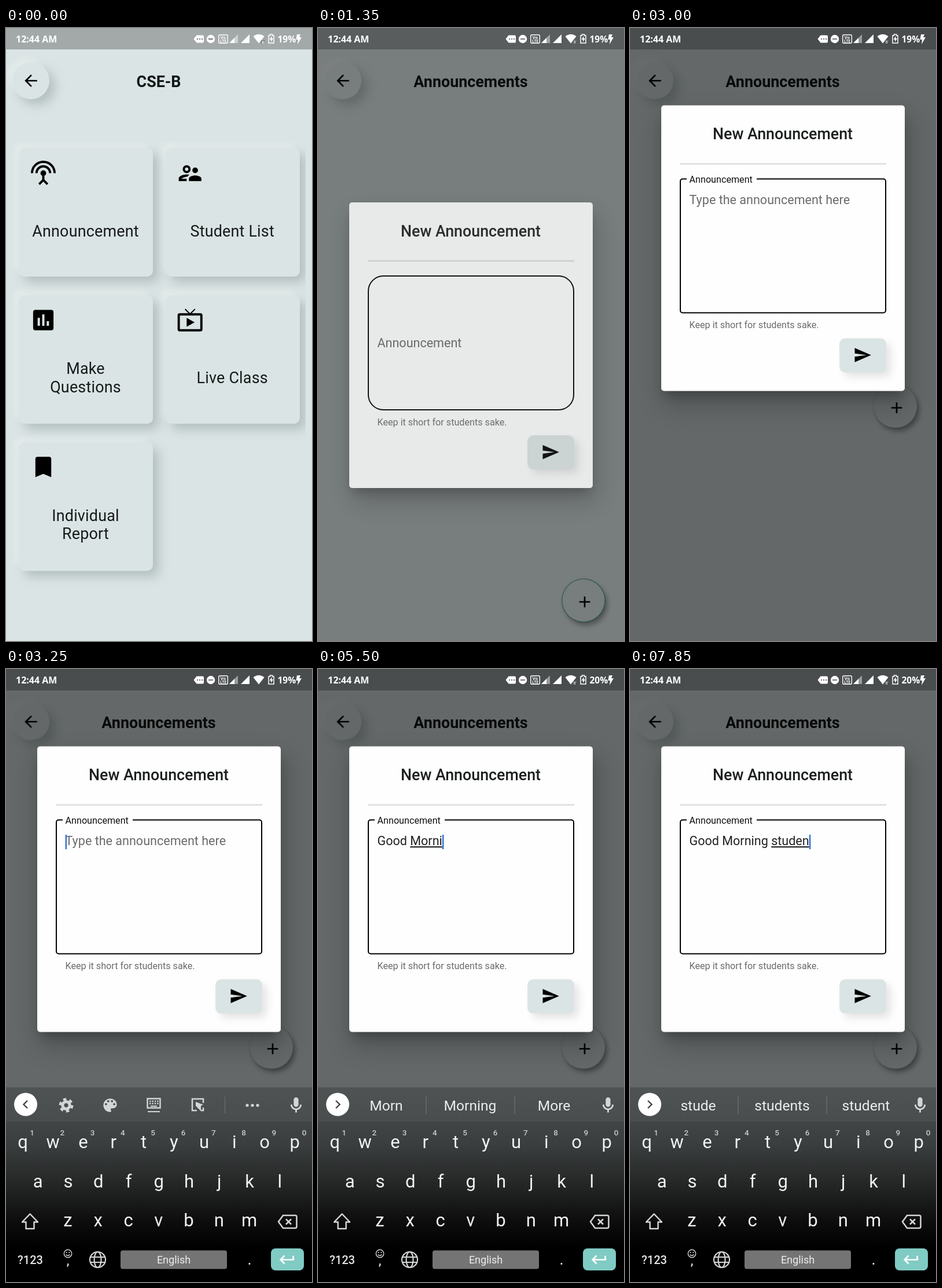
Write an HTML page that moves like this. It is 529 px wide and 1058 px high and loops after 8000 ms.

```html
<!DOCTYPE html>
<html>
<head>
<meta charset="utf-8">
<style>
html, body { margin: 0; width: 100%; height: 100%; overflow: hidden; background: #dbe4e4; }
#stage { position: relative; width: 529px; height: 1058px; overflow: hidden; }
#stage div, svg { position: absolute; }
.layer, svg { left: 0; top: 0; width: 529px; height: 1058px; }
svg { overflow: visible; }
text { font-family: Roboto, sans-serif; white-space: pre; }
.status text { font-family: "Noto Sans", sans-serif; }
.page { background: #dbe4e4; }
.soft { background: #dbe4e4; box-shadow: -8px -8px 12px rgba(255,255,255,.26), 10px 10px 18px rgba(110,128,128,.36); }
.round { border-radius: 50%; }
#grid { left: 11px; top: 196px; width: 507px; height: 820px; overflow: hidden; }
.card { width: 232px; height: 222px; border-radius: 10px; }
#fab { left: 422px; top: 951px; width: 74px; height: 74px; background: #dbe4e4; box-shadow: 4px 6px 9px rgba(0,0,0,.36), 0 0 5px rgba(0,0,0,.08); }
#barrier { background: #000; }
#dialog { left: 54px; top: 301px; width: 421px; height: 493px; border-radius: 5px; background: #fdfefd;
  box-shadow: 0 13px 18px -6px rgba(0,0,0,.24), 6px 22px 44px 4px rgba(0,0,0,.2); }
#field { left: 32px; top: 125.5px; width: 357px; height: 233px; box-sizing: border-box; border: 2.8px solid #000; }
#gap { left: 44px; top: 124px; height: 6px; background: #fdfefd; }
#send { left: 308px; top: 401.5px; width: 81px; height: 59px; border-radius: 10px; background: #dbe4e4; box-shadow: 8px 8px 14px rgba(0,0,0,.1); }
#keys { background: linear-gradient(#4f5353 722px, #494d4d 781px, #414545 781px, #3b3e3e 820px, #262828 885px, #0e0e0e 950px, #000 1000px); clip-path: inset(722px 0 0 0); }
.status { height: 37px !important; background: rgba(0,0,0,.26); }
</style>
</head>
<body>
<div id="stage"></div>
<script>
const icons = {
  back: 'M20 11H7.83l5.59-5.59L12 4l-8 8 8 8 1.41-1.41L7.83 13H20z',
  antenna: 'M12 5a7 7 0 0 0-7 7h2a5 5 0 0 1 10 0h2a7 7 0 0 0-7-7zm1 9.29a2.5 2.5 0 1 0-2 0v3.3L7.59 21 9 22.41l3-3 3 3L16.41 21 13 17.59zM12 1A11 11 0 0 0 1 12h2a9 9 0 0 1 18 0h2A11 11 0 0 0 12 1z',
  people: 'M16.5 12a2.5 2.5 0 1 0 0-5 2.5 2.5 0 0 0 0 5zM9 12a3.5 3.5 0 1 0 0-7 3.5 3.5 0 0 0 0 7zm0-5a1.5 1.5 0 1 1 0 3 1.5 1.5 0 0 1 0-3zm7.5 7c-1.83 0-5.5.92-5.5 2.75V19h11v-2.25c0-1.83-3.67-2.75-5.5-2.75zM9 13.2c-2.33 0-7 1.1-7 3.4V19h7v-2H4.3c.9-.9 3.3-1.8 5.4-1.8.3-.7.9-1.3 1.7-1.8-.9-.1-1.7-.2-2.4-.2z',
  chart: 'M19 3H5a2 2 0 0 0-2 2v14a2 2 0 0 0 2 2h14a2 2 0 0 0 2-2V5a2 2 0 0 0-2-2zM9 17H7v-7h2zm4 0h-2V7h2zm4 0h-2v-4h2z',
  tv: 'M21 6h-7.59l3.29-3.29L16 2l-4 4-4-4-.7.71L10.59 6H3a2 2 0 0 0-2 2v12a2 2 0 0 0 2 2h18a2 2 0 0 0 2-2V8a2 2 0 0 0-2-2zm0 14H3V8h18zM9 10v8l7-4z',
  bookmark: 'M17 3H7a2 2 0 0 0-2 2v16l7-3 7 3V5a2 2 0 0 0-2-2z',
  add: 'M19 13h-6v6h-2v-6H5v-2h6V5h2v6h6z',
  send: 'M2 21L23 12 2 3v7l15 2-15 2z',
  palette: 'M12 3a9 9 0 0 0 0 18 1.5 1.5 0 0 0 1.1-2.5 1.5 1.5 0 0 1 1.1-2.5H16a5 5 0 0 0 5-5c0-4.4-4-8-9-8zM6.5 12a1.5 1.5 0 1 1 0-3 1.5 1.5 0 0 1 0 3zm3-4a1.5 1.5 0 1 1 0-3 1.5 1.5 0 0 1 0 3zm5 0a1.5 1.5 0 1 1 0-3 1.5 1.5 0 0 1 0 3zm3 4a1.5 1.5 0 1 1 0-3 1.5 1.5 0 0 1 0 3z',
  mic: 'M12 14a3 3 0 0 0 3-3V5a3 3 0 0 0-6 0v6a3 3 0 0 0 3 3zm5-3a5 5 0 0 1-10 0H5a7 7 0 0 0 6 6.92V21h2v-3.08A7 7 0 0 0 19 11z',
  enter: 'M19 7v4H5.83l3.58-3.59L8 6l-6 6 6 6 1.41-1.41L5.83 13H21V7z'
};
const $ = id => document.getElementById(id);
const svg = body => `<svg>${body}</svg>`;
const icon = (name, x, y, size, fill = '#000') =>
  `<path d="${icons[name]}" fill="${fill}" transform="translate(${x - size / 2} ${y - size / 2}) scale(${size / 24})"/>`;
const text = (x, y, size, str, fill = '#161a1a', extra = '') =>
  `<text x="${x}" y="${y}" font-size="${size}" fill="${fill}" ${extra}>${str}</text>`;
const mid = (x, y, size, str, fill, extra = '') => text(x, y, size, str, fill, 'text-anchor="middle" ' + extra);
const line = (d, color, width, extra = '') =>
  `<path d="${d}" fill="none" stroke="${color}" stroke-width="${width}" ${extra}/>`;
const dot = (x, y, r, fill) => `<circle cx="${x}" cy="${y}" r="${r}" fill="${fill}"/>`;

const header = title => svg(icon('back', 43, 91, 32.4) + mid(264, 101.5, 26.9, title, '#111616', 'font-weight="700"'));
const backButton = '<div class="soft round" style="left:11px;top:59px;width:64px;height:64px"></div>';

const cards = [['antenna', 'Announcement'], ['people', 'Student List'], ['chart', 'Make', 'Questions'],
  ['tv', 'Live Class'], ['bookmark', 'Individual', 'Report']];
const cardBox = (_, i) => `<div class="card soft" style="left:${11 + i % 2 * 253.5}px;top:${11 + (i >> 1) * 253.8}px"></div>`;
const cardFace = ([name, ...rows], i) => {
  const x = i % 2 * 253.7, y = (i >> 1) * 253.6;
  return icon(name, 64.5 + x, 250.5 + y, 47) + rows.map((row, k) =>
    mid(137.5 + x, 359.5 + y + (k - (rows.length - 1) / 2) * 31.5, 26.9, row, '#161a1a', 'letter-spacing=".2"')).join('');
};

function statusBar() {
  const w = '#fff', g = '#777';
  return text(17, 25, 16, '12:44 AM', w, 'font-weight="700"') +
    `<path d="M324.5 19l5-6.5H340q2 0 2 2v9q0 2-2 2h-10.500z" fill="${w}"/>` +
    [331, 335, 339].map(x => dot(x, 19, 1.2, g)).join('') +
    dot(354, 19, 7.2, w) + line('M350 19h8', g, 2) +
    `<rect x="367.700" y="11.700" width="15.600" height="14.600" rx="2" fill="none" stroke="${w}" stroke-width="1.400"/>` +
    mid(375.5, 18.5, 7.5, 'Vo', w, 'font-weight="700"') + mid(375.5, 25, 6.500, 'LTE', w, 'font-weight="700"') +
    `<path d="M386 26l15-15v15z" fill="${w}" opacity=".45"/><path d="M386 26l9-9v9z" fill="${w}"/>` +
    `<path d="M406 26l15-15v15z" fill="${w}"/><path d="M437 26.500L427.500 14.500Q437 7 446.500 14.500z" fill="${w}"/>` +
    `<g id="traffic">${line('M441.500 27v-5h6', g, 1.500)}<path d="M442.500 24l1.500-2 1.500 2zM442.500 25l1.500 2 1.500-2z" fill="${w}"/></g>` +
    line('M454 13h2.500v-2h4v2h2.500v13h-9z', w, 1.500) + `<path d="M459.500 14l-4 6h2.500v4l4-6h-2.500z" fill="${w}"/>` +
    `<text id="charge" x="469.500" y="25" font-size="15.500" font-weight="600" fill="${w}"></text>` +
    `<path d="M503 11h6l-2 5h4l-7 12 1-8h-3.500z" fill="${w}"/>`;
}

const rows = ['qwertyuiop', 'asdfghjkl', 'zxcvbnm'], rowX = [29, 55.3, 107];
const letters = upper => rows.map((row, r) => [...row].map((c, i) =>
  mid(rowX[r] + 52.25 * i, (upper ? 830 : 827) + 67.5 * r, 31, upper ? c.toUpperCase() : c, '#f1f2f2')).join('')).join('');

function keyboard() {
  const c = '#d4d6d6';
  const toolbar =
    `<g fill="none" stroke="${c}" transform="translate(104 753)"><circle r="6.200" stroke-width="5"/><circle r="10.200" stroke-width="4.400" stroke-dasharray="5.340"/></g>` +
    icon('palette', 180, 753, 31, c) +
    line('M244.500 741.500h22v16h-22z', c, 2.400) + line('M248 746h16M248 750h16', c, 2.400, 'stroke-dasharray="2.400 2"') +
    line('M250 754.500h11M245 764h21', c, 2) +
    line('M341 749v-7h-19v20h8M341 757v5h-4', c, 2.500) + `<path d="M328 747l13 5-4 2v9l-9-9z" fill="${c}"/>` +
    [417, 426, 435].map(x => dot(x, 753, 2.6, c)).join('') + line('M378.500 738v29', '#686c6c', 1.300);
  return `<g id="toolbar">${toolbar}</g><g id="suggest"></g>` +
    dot(34, 751.5, 20, '#fff') + line('M37 745l-6.500 6.500 6.500 6.500', '#444', 2.400, 'id="chevron"') +
    icon('mic', 501.5, 753, 33, c) +
    `<g id="lower">${letters(false)}</g><g id="upper">${letters(true)}</g>` +
    [...'1234567890'].map((d, i) => mid(45 + 52.3 * i, 805, 13.5, d, '#c9cccc', 'font-weight="500"')).join('') +
    line('M41.500 940.500L55 954.500H48.500V966H34.500V954.500H28z', c, 2.500, 'id="shift" stroke-linejoin="round"') +
    line('M479 943h21q2.500 0 2.500 2.500v17q0 2.500-2.500 2.500h-21l-8-11z', c, 2.500) + line('M484 949.500l9 9m0-9l-9 9', c, 2.500) +
    mid(42, 1027, 20, '?123', '#e6e6e6', 'font-weight="500"') +
    `<circle cx="107" cy="1009" r="6.700" fill="none" stroke="${c}" stroke-width="1.400"/>` +
    dot(104.7, 1007, 1.1, c) + dot(109.3, 1007, 1.1, c) + line('M103.500 1010.500q3.500 4 7 0', c, 1.400) + mid(107, 1029, 24, ',', '#eee') +
    `<g fill="none" stroke="${c}" stroke-width="2.200"><circle cx="158.500" cy="1019.500" r="13.500"/><ellipse cx="158.500" cy="1019.500" rx="6" ry="13.500"/><path d="M146 1015h25M146 1024h25"/></g>` +
    `<rect x="198" y="1003.500" width="184" height="32" rx="4" fill="#747474"/>` + mid(290, 1026, 18, 'English', '#eee') +
    mid(421, 1028, 27, '.', '#eee') +
    `<rect x="458" y="1000" width="57" height="38" rx="8" fill="#80cbc4"/>` + icon('enter', 486, 1019.5, 32, '#fff');
}

const face = (x, extra) => dot(x, 753, 13, '#fcc936') + extra;
const eye = '#593a1c';
const emojis = [
  face(118, line('M110 750q3-3 6 0M107 747l5-2', eye, 1.8) + dot(124, 749, 2, eye) + line('M117 755q5 1 1 3 4 2-1 4', eye, 1.6) +
    '<path d="M126 766l-5-6q0-5 5-2 6-3 6 2z" fill="#dd2c4f"/>'),
  '<circle cx="263" cy="753" r="10.500" fill="none" stroke="#f59b23" stroke-width="6" stroke-dasharray="5 3.250"/>' +
    dot(263, 753, 9.5, '#fcc21b') + dot(259.5, 751, 1.3, eye) + dot(266.5, 751, 1.3, eye) + line('M258 755q5 5 10 0', eye, 1.5),
  face(408, dot(399, 754, 2.6, '#f79a4b') + dot(417, 754, 2.6, '#f79a4b') +
    line('M401 750q2.500-4 5 0M410 750q2.500-4 5 0M402 756q6 7 12 0', eye, 1.8))
].join('');

$('stage').innerHTML =
  `<div class="layer page">${backButton}<div id="grid">${cards.map(cardBox).join('')}</div>${header('CSE-B') + svg(cards.map(cardFace).join(''))}</div>` +
  `<div class="layer page" id="board">${backButton}${header('Announcements')}<div class="layer" id="lift"><div id="fab" class="round"></div>` +
  svg(`<circle id="ring" cx="459" cy="988" r="37" fill="none" stroke="#168a7c" stroke-width="1.200" stroke-dasharray="2 1"/>` + icon('add', 461, 990.5, 32)) + '</div></div>' +
  '<div class="layer" id="barrier"></div>' +
  '<div id="dialog"><div id="field"></div><div id="gap"></div><div id="send"></div>' +
  svg(mid(210, 58.500, 26.8, 'New Announcement', '#1c1f1f', 'font-weight="500"') + line('M32 101h357', '#dcdddd', 2.700) +
    text(0, 0, 21.55, 'Announcement', '#666', 'id="label"') + text(48.5, 170.5, 21.55, 'Type the announcement here', '#6b6b6b', 'id="hint"') +
    text(48.5, 170.5, 21.55, '', '#222', 'id="typed"') + '<rect id="caret" y="152.500" width="2.700" height="25" fill="#3d78d4"/>' +
    text(48.5, 384.5, 16.16, 'Keep it short for students sake.', '#6b6b6b') + icon('send', 348, 431, 32.4)) + '</div>' +
  `<div class="layer" id="keys">${svg(keyboard())}</div>` +
  `<div class="layer status">${svg(statusBar())}</div>`;

// [time, composed text, word being typed]
const typing = [[0, '', ''], [3600, '', 'G'], [3750, '', 'Go'], [3850, '', 'Goo'], [4050, '', 'Good'], [4300, 'Good ', ''],
  [4750, 'Good ', 'M'], [4950, 'Good ', 'Mo'], [5150, 'Good ', 'Mor'], [5350, 'Good ', 'Morn'], [5500, 'Good ', 'Morni'],
  [5650, 'Good ', 'Mornin'], [6000, 'Good ', 'Morning'], [6350, 'Good Morning ', ''], [6950, 'Good Morning ', 's'],
  [7100, 'Good Morning ', 'st'], [7200, 'Good Morning ', 'stu'], [7300, 'Good Morning ', 'stud'],
  [7450, 'Good Morning ', 'stude'], [7650, 'Good Morning ', 'studen']];
const hints = [[3600, 'G Good Go'], [3800, 'Go Good Got'], [4100, 'Goo Good Goods'], [4350, 'luck morning night'], [4800, 'M My More'],
  [5000, 'Mo More Mom'], [5200, 'Mor More Morning'], [5450, 'Morn Morning More'], [5750, 'Morni Morning Mornings'],
  [6100, 'Mornin Morning Mornings'], [6350, ''], [7000, 's to and'], [7200, 'st students still'],
  [7350, 'stu students student'], [7450, 'stud students student'], [7750, 'stude students student']];

const at = (list, t) => list.filter(e => e[0] <= t).pop();
const within = (t, a, b) => t >= a && t < b;
const part = (t, start, length) => Math.min(1, Math.max(0, (t - start) / length));
const mix = (a, b, p) => a + (b - a) * p;
const show = (id, on) => $(id).style.display = on ? '' : 'none';
function bezier(x1, y1, x2, y2) {
  const curve = (a, b, u) => 3 * a * u * (1 - u) ** 2 + 3 * b * u * u * (1 - u) + u ** 3;
  return x => {
    let lo = 0, hi = 1;
    for (let i = 0; i < 20; i++) {
      const m = (lo + hi) / 2;
      if (curve(x1, x2, m) < x) lo = m; else hi = m;
    }
    return x <= 0 ? 0 : x >= 1 ? 1 : curve(y1, y2, lo);
  };
}
const standard = bezier(.4, 0, .2, 1), easeIn = bezier(.42, 0, 1, 1), easeOut = bezier(0, 0, .58, 1);

function draw(t) {
  const enter = part(t, 20, 330);
  $('board').style.opacity = easeIn(enter);
  $('board').style.transform = `translateY(${264 * (1 - standard(enter))}px)`;

  const raised = t >= 3000, open = easeOut(part(t, 1250, 150));
  $('lift').style.transform = `translateY(${raised ? -335 : 0}px)`;
  show('ring', within(t, 1250, 1500));
  $('barrier').style.opacity = .54 * open;
  $('dialog').style.opacity = open;
  $('dialog').style.transform = `translateY(${raised ? -167.500 : 0}px)`;

  const focus = standard(part(t, 2100, 200));
  $('field').style.borderRadius = mix(27, 5, focus) + 'px';
  $('gap').style.width = 121 * focus + 'px';
  $('label').setAttribute('transform', `translate(48.5 ${mix(249.5, 133.5, focus)}) scale(${mix(1, .75, focus)})`);
  $('label').setAttribute('fill', focus > .5 ? '#111' : '#666');

  const [, done, word] = at(typing, t);
  const spaced = within(t, 6150, 6350) ? ' ' : '';
  $('typed').innerHTML = `${done}<tspan text-decoration="underline">${word}</tspan>${spaced}`;
  $('hint').style.opacity = done + word ? 0 : focus;
  $('caret').setAttribute('x', 48.5 + (done + word ? $('typed').getComputedTextLength() : 0));
  show('caret', within(t, 2150, 2600) || t >= 3100 && !within(t, 6750, 6950));

  const rise = part(t, 3000, 200);
  $('keys').style.opacity = rise;
  $('keys').style.transform = `translateY(${67 * (1 - easeOut(rise))}px)`;
  const upper = within(t, 3350, 3650) || within(t, 4300, 4800);
  show('upper', upper);
  show('lower', !upper);
  $('shift').setAttribute('fill', upper ? '#d4d6d6' : 'none');
  const hint = at(hints, t);
  show('toolbar', !hint);
  $('chevron').setAttribute('transform', hint ? 'translate(68 0) scale(-1 1)' : '');
  $('suggest').innerHTML = !hint ? '' : line('M187 737v31M340 737v31', '#6c7070', 1.3) +
    (hint[1] ? hint[1].split(' ').map((s, i) => mid(118 + 145 * i, 761.5, 24.6, s, '#eceeee')).join('') : emojis);

  $('charge').textContent = t < 3450 ? '19%' : '20%';
  show('traffic', t < 1000 || within(t, 1100, 3050) || t >= 5000);
}

const start = performance.now();
function tick() {
  const t = (performance.now() - start) % 8000;
  draw(Math.floor(t / 50) * 50);
  requestAnimationFrame(tick);
}
tick();
</script>
</body>
</html>
```
